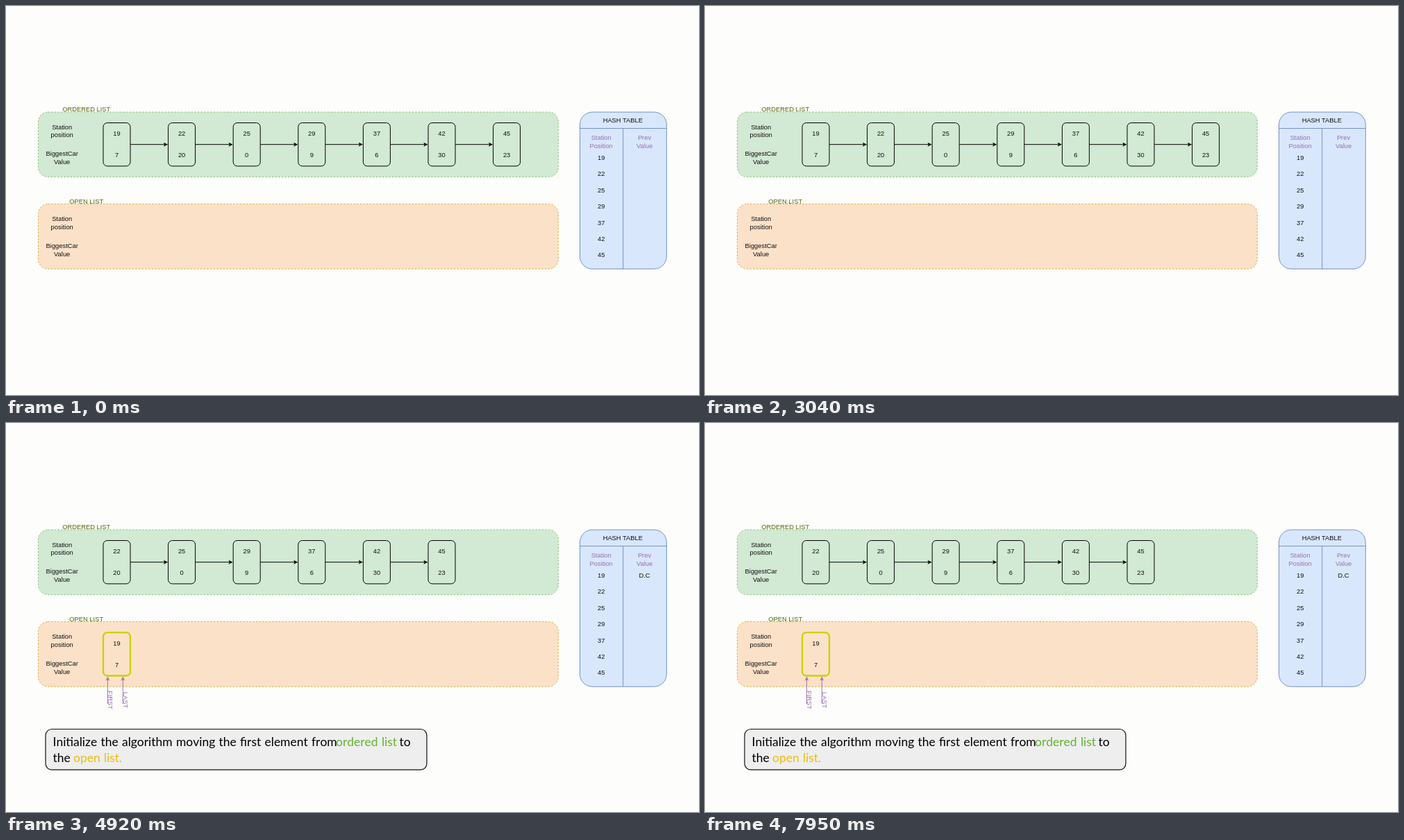
Write an HTML page that moves like this. It is 998 by 561 pixels and loops after 7990 ms.

```html
<!DOCTYPE html>
<html lang="en">
<head>
<meta charset="utf-8">
<title>Ordered list to open list</title>
<style>
  html, body { margin: 0; width: 100%; height: 100%; overflow: hidden; background: #fdfdfb; }
  svg { display: block; width: 998px; height: 561px; }
  text { font: 9.36px "Liberation Sans", Arial, sans-serif; fill: #111; text-anchor: middle; }
  .title { fill: #4f6a08; }
  .purple { fill: #9b6fb0; }
  .panel { stroke-dasharray: 2.34; }
  .caption text { font: 17.47px Lato, sans-serif; word-spacing: .85px; font-kerning: none; text-anchor: start; fill: #000; }
</style>
</head>
<body>
<svg id="stage" viewBox="0 0 998 561"></svg>
<script>
const LOOP = 7990, SWITCH = 4550;
const UNIT = 0.78, PITCH = 120 * UNIT;
const BOX = { x: 140, y: 168.5, w: 50 * UNIT, h: 80 * UNIT };
const OPEN_SHIFT = 132.6;
const stations = [[19, 7], [22, 20], [25, 0], [29, 9], [37, 6], [42, 30], [45, 23]];

const text = (x, y, content, cls = "", extra = "") =>
  `<text x="${x}" y="${y}" class="${cls}" ${extra}>${content}</text>`;

const rect = (x, y, w, h, r, fill, stroke, width = 1, cls = "") =>
  `<rect x="${x}" y="${y}" width="${w}" height="${h}" rx="${r}" fill="${fill}" stroke="${stroke}" stroke-width="${width}" class="${cls}"/>`;

const line = (x1, y1, x2, y2, color) =>
  `<path d="M${x1} ${y1}L${x2} ${y2}" stroke="${color}"/>`;

function arrow(x1, y1, x2, y2, color) {
  const angle = Math.atan2(y2 - y1, x2 - x1) * 180 / Math.PI;
  const length = Math.hypot(x2 - x1, y2 - y1);
  return `<g transform="translate(${x1} ${y1}) rotate(${angle})">
    ${line(0, 0, length - 4, 0, color)}
    <path d="M${length} 0l-6.2 -3l1.5 3l-1.5 3z" fill="${color}"/></g>`;
}

function panel(y, title, titleX, fill, stroke) {
  return rect(46.5, y, 960 * UNIT, PITCH, 14, fill, stroke, 1, "panel") +
    text(titleX, y - 1, title, "title") +
    text(80.7, y + 24.5, "Station") + text(80.7, y + 36.2, "position") +
    text(80.7, y + 63.4, "BiggestCar") + text(80.7, y + 75.2, "Value");
}

function node([position, value], index, dy = 0, stroke = "#000", width = 1) {
  const x = BOX.x + index * PITCH, y = BOX.y + dy, mid = x + BOX.w / 2;
  return rect(x, y, BOX.w, BOX.h, 5.85, "none", stroke, width) +
    text(mid, y + 18.5, position) + text(mid, y + 49.7, value);
}

function linkedList(items) {
  const y = BOX.y + BOX.h / 2;
  return items.map((item, i) => {
    const x = BOX.x + i * PITCH;
    return node(item, i) + (i ? arrow(x - PITCH + BOX.w, y, x - 0.5, y, "#000") : "");
  }).join("");
}

function hashTable(firstValue) {
  const blue = "#7593c6";
  return rect(826.5, 153, 124.8, 226.2, 18, "#d8e7fc", blue) +
    line(826.5, 176.5, 951.3, 176.5, blue) + line(888.7, 176.5, 888.7, 379.2, blue) +
    text(888.3, 167.5, "HASH TABLE") +
    text(857.2, 193.2, "Station", "purple") + text(857.2, 205, "Position", "purple") +
    text(919.5, 193.2, "Prev", "purple") + text(919.5, 205, "Value", "purple") +
    stations.map(([position], i) => text(857.2, 222 + i * 23.4, position)).join("") +
    text(919.5, 222, firstValue);
}

function pointer(x, label) {
  const labelX = x + 0.2;
  return arrow(x, 404, x, 364.5, "#a17ab3") +
    text(labelX, 398.5, label, "purple", `transform="rotate(90 ${labelX} 398.5)"`);
}

const caption = `<g class="caption">
  ${rect(57, 441.5, 549, 58.7, 9, "#eeeeef", "#111", 1.2)}
  <text x="67.5" y="466">Initialize the algorithm moving the first element from
    <tspan x="475" fill="#63b32e">ordered list</tspan> <tspan x="566.5">to</tspan></text>
  <text x="67.5" y="488.5">the <tspan x="97" fill="#f0bd0c">open list.</tspan></text></g>`;

function scene(moved) {
  return `<g fill="none" transform="translate(0 ${moved ? 1 : 0})">
    ${panel(153, "ORDERED LIST", 115.7, "#d2e9d3", "#82c26e")}
    ${panel(153 + OPEN_SHIFT, "OPEN LIST", 115.7, "#fbe1c8", "#dfa737")}
    ${linkedList(moved ? stations.slice(1) : stations)}
    ${hashTable(moved ? "D.C" : "")}
    ${moved ? node(stations[0], 0, OPEN_SHIFT, "#c8d300", 2.3) + pointer(146.5, "FIRST") + pointer(168.3, "LAST") : ""}
    </g>${moved ? caption : ""}`;
}

const stage = document.getElementById("stage");
const scenes = [scene(false), scene(true)];
let shown = -1;

function draw() {
  const next = performance.now() % LOOP < SWITCH ? 0 : 1;
  if (next !== shown) stage.innerHTML = scenes[shown = next];
  requestAnimationFrame(draw);
}
draw();
</script>
</body>
</html>
```
